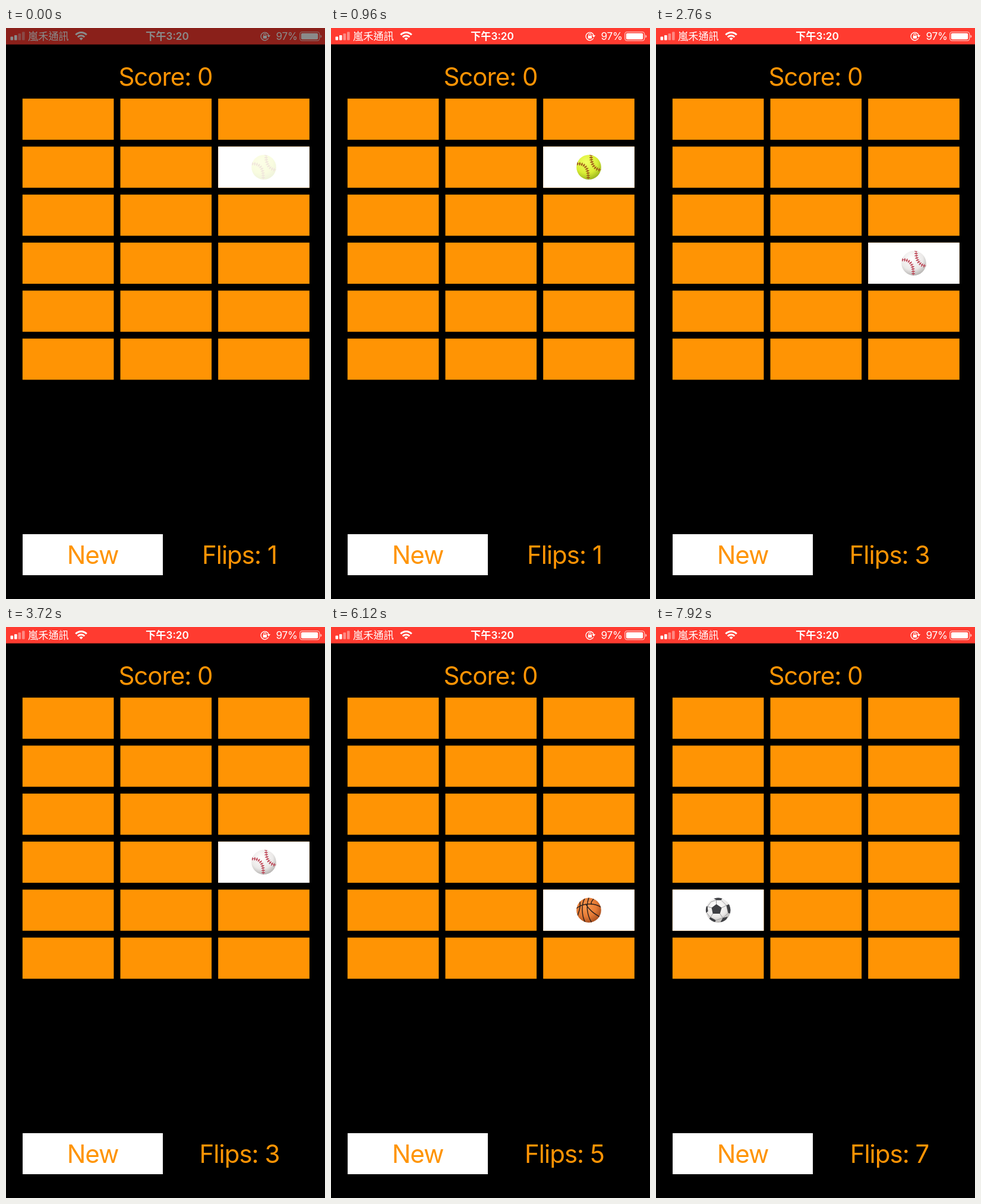
Animation, 537 px wide and 960 px high, one loop 8 s. Source, as an HTML page:

```html
<!DOCTYPE html>
<html lang="zh-Hant">
<head>
<meta charset="utf-8">
<title>Matching game</title>
<style>
  html, body { margin: 0; width: 100%; height: 100%; overflow: hidden; background: #000; }
  svg { display: block; width: 100%; height: 100%; }
  text { font-family: Inter, "Noto Sans CJK TC", "Noto Sans CJK", sans-serif; font-optical-sizing: none; }
  .big { font-size: 42px; letter-spacing: -1px; fill: #ff9404; text-anchor: middle; }
  .bar text { font-size: 17.2px; fill: #fff; }
  .line { fill: none; stroke-linecap: round; }
</style>
</head>
<body>
<svg viewBox="0 0 537 960">
  <defs>
    <radialGradient id="lime" cx=".4" cy=".3" r=".75">
      <stop offset="0" stop-color="#f2ff63"/><stop offset=".6" stop-color="#d8ee35"/><stop offset="1" stop-color="#94ae1c"/>
    </radialGradient>
    <radialGradient id="white" cx=".42" cy=".32" r=".75">
      <stop offset="0" stop-color="#fff"/><stop offset=".6" stop-color="#ebe9e8"/><stop offset="1" stop-color="#a9a6a4"/>
    </radialGradient>
    <radialGradient id="rust" cx=".4" cy=".35" r=".75">
      <stop offset="0" stop-color="#fa9a50"/><stop offset=".55" stop-color="#e57a35"/><stop offset="1" stop-color="#96431a"/>
    </radialGradient>
    <radialGradient id="tan" cx=".5" cy=".35" r=".7">
      <stop offset="0" stop-color="#eab25c"/><stop offset=".55" stop-color="#d3913f"/><stop offset="1" stop-color="#8f5520"/>
    </radialGradient>
    <clipPath id="round"><circle r="20.8"/></clipPath>
    <path id="seams" d="M-20-6C-8-6 0 0 -1 20M4-21C3-6 9 4 21 5"/>

    <g id="softball">
      <circle r="20.8" fill="url(#lime)"/>
      <g class="line" stroke="#9c4a16" clip-path="url(#round)">
        <use href="#seams" stroke-width="1"/>
        <use href="#seams" stroke-width="5.5" stroke-dasharray="1.5 2.3" stroke-linecap="butt"/>
      </g>
    </g>
    <g id="baseball">
      <circle r="20.8" fill="url(#white)"/>
      <g class="line" stroke="#b9384a" clip-path="url(#round)">
        <use href="#seams" stroke-width="1"/>
        <use href="#seams" stroke-width="5.5" stroke-dasharray="1.4 2.4" stroke-linecap="butt"/>
      </g>
    </g>
    <g id="soccer">
      <circle r="20.8" fill="url(#white)"/>
      <g clip-path="url(#round)">
        <path class="line" stroke="#9b9b9d" stroke-width="1"
          d="M-3-10L-3-17M6-4L14-8M3 6L8 13M-9 6L-13 12M-11-4L-18-6M-13 12L-4 17 8 13 17 5 14-8 5-17-3-17-12-14-18-6-19 4Z"/>
        <path fill="#3f4044"
          d="M-3-10L6-4 3 6-9 6-11-4ZM-12-22L-3-17 5-17 9-22ZM14-8L22-12 22 6 17 5ZM8 13L16 11 11 22 4 20ZM-13 12L-4 17-6 22-18 18ZM-18-6L-17 2-23 6-22-8Z"/>
      </g>
    </g>
    <g id="football">
      <path fill="url(#tan)" d="M19-19C22-12 21 4 12 13 4 20-9 22-18 19-22 11-22-2-12-11-4-19 11-22 19-19Z"/>
      <path class="line" stroke="#8a5321" stroke-width="1" d="M-15-7C-8 3 2 6 8 1 13-4 8-14 2-18"/>
      <path class="line" stroke="#4d3015" stroke-width="1.4"
        d="M-14-4L5-12M-15-8L-11-1M-11-11L-6-2M-7-14L-1-4M-2-16L4-7M3-18L8-10"/>
    </g>
    <g id="basketball">
      <circle r="20.8" fill="url(#rust)"/>
      <path class="line" stroke="#30211b" stroke-width="1.5" clip-path="url(#round)"
        d="M-21-3C-10-12 8-13 21-5M-7-20C-13-8-12 9-6 21M0-21C-5-8-3 9 5 21M-5-10C1 0 8 5 18 11M-19 9C-16 1-14-4-15-14M8-19C4-14 3-12 5-10"/>
    </g>
  </defs>

  <rect width="537" height="960"/>

  <g class="bar">
    <rect width="537" height="27.5" fill="#ff3b30"/>
    <g fill="#fff">
      <rect x="7.5" y="14.5" width="4.6" height="6" rx="1"/>
      <rect x="14" y="12" width="4.6" height="8.5" rx="1"/>
      <g opacity=".4">
        <rect x="20.5" y="9.3" width="4.6" height="11.2" rx="1"/>
        <rect x="27" y="6.5" width="4.6" height="14" rx="1"/>
      </g>
    </g>
    <text x="37" y="20">嵐禾通訊</text>
    <g class="line" stroke="#fff" stroke-width="3" style="stroke-linecap:butt">
      <path d="M117.3 11.6A12.4 12.4 0 0 1 135.7 11.6M120.8 15.2A8 8 0 0 1 132.2 15.2"/>
      <path d="M126.5 20.8L123.4 17.5A4.4 4.4 0 0 1 129.6 17.5Z" fill="#fff" stroke="none"/>
    </g>
    <text x="271.5" y="20" text-anchor="middle" font-weight="600">下午3:20</text>
    <path class="line" stroke="#fff" stroke-width="1.4" d="M441.5 17.5A6.7 6.7 0 1 1 442.2 12.5"/>
    <path fill="#fff" d="M439.3 12.2H445.2L442.3 16ZM432.7 13H439V17.8H432.7Z"/>
    <path class="line" stroke="#fff" stroke-width="1.1" d="M434 13V11.5A1.8 1.8 0 0 1 437.7 11.5V13"/>
    <text x="454.5" y="20" letter-spacing="-.3">97%</text>
    <rect x="494.7" y="6.7" width="33" height="14.6" rx="3.8" fill="none" stroke="#fff" stroke-opacity=".65" stroke-width="1.3"/>
    <rect x="496.8" y="8.8" width="28.4" height="10.4" rx="2" fill="#fff"/>
    <path d="M529.2 11.5Q531.5 12 531.5 14T529.2 16.5Z" fill="#fff" opacity=".65"/>
    <rect id="shade" width="537" height="27.5"/>
  </g>

  <text class="big" x="268.5" y="96.5">Score: 0</text>
  <g id="board"></g>
  <rect x="28" y="851" width="236" height="69" fill="#fff"/>
  <text class="big" x="146" y="901">New</text>
  <text class="big" id="count" x="393" y="901"></text>
</svg>
<script>
const LOOP = 8000, STEP = 120;
const CARD = { x: 27.8, y: 118.7, w: 153.6, h: 69.2, dx: 164.7, dy: 80.7 };
const FADE = [.15, .7, 1];
const SHADE = [.46, .2, 0];

// each flip: time, column, row, ball
const FLIPS = [
  [0, 2, 1, 'softball'],
  [1200, 1, 4, 'football'],
  [2280, 2, 3, 'baseball'],
  [3960, 1, 2, 'soccer'],
  [5160, 2, 4, 'basketball'],
  [6480, 0, 3, 'football'],
  [7440, 0, 4, 'soccer']
];

const byId = id => document.getElementById(id);
const board = byId('board');

function add(tag, attrs) {
  const el = document.createElementNS('http://www.w3.org/2000/svg', tag);
  for (const key in attrs) el.setAttribute(key, attrs[key]);
  return board.appendChild(el);
}

const spot = (col, row) => ({ x: CARD.x + col * CARD.dx, y: CARD.y + row * CARD.dy });
const addCard = (col, row, fill) =>
  add('rect', { ...spot(col, row), width: CARD.w, height: CARD.h, fill });

for (let i = 0; i < 18; i++) addCard(i % 3, Math.floor(i / 3), '#ff9404');

const cards = FLIPS.map(([, col, row, ball]) => {
  const { x, y } = spot(col, row);
  const face = addCard(col, row, '#fff');
  const move = `translate(${x + CARD.w / 2} ${y + CARD.h / 2})`;
  return { face, ball: add('use', { href: '#' + ball, transform: move }) };
});

const at = (levels, ms) => levels[Math.min(levels.length - 1, Math.floor(ms / STEP))];

function draw(time) {
  const t = Math.floor(time % LOOP / STEP) * STEP;
  const count = FLIPS.filter(flip => flip[0] <= t).length;
  const last = count - 1;
  const fade = at(FADE, t - FLIPS[last][0]);
  const firstUp = last - last % 2;   // cards stay up in pairs

  cards.forEach(({ face, ball }, i) => {
    const up = i >= firstUp && i <= last;
    const leaving = last === firstUp && i < firstUp && i >= firstUp - 2;
    face.setAttribute('opacity', up ? 1 : 0);
    ball.setAttribute('opacity', up ? (i === last ? fade : 1) : leaving ? 1 - fade : 0);
  });
  byId('count').textContent = 'Flips: ' + count;
  byId('shade').setAttribute('opacity', at(SHADE, t));
}

function tick() {
  draw(performance.now());
  requestAnimationFrame(tick);
}
tick();
</script>
</body>
</html>
```
